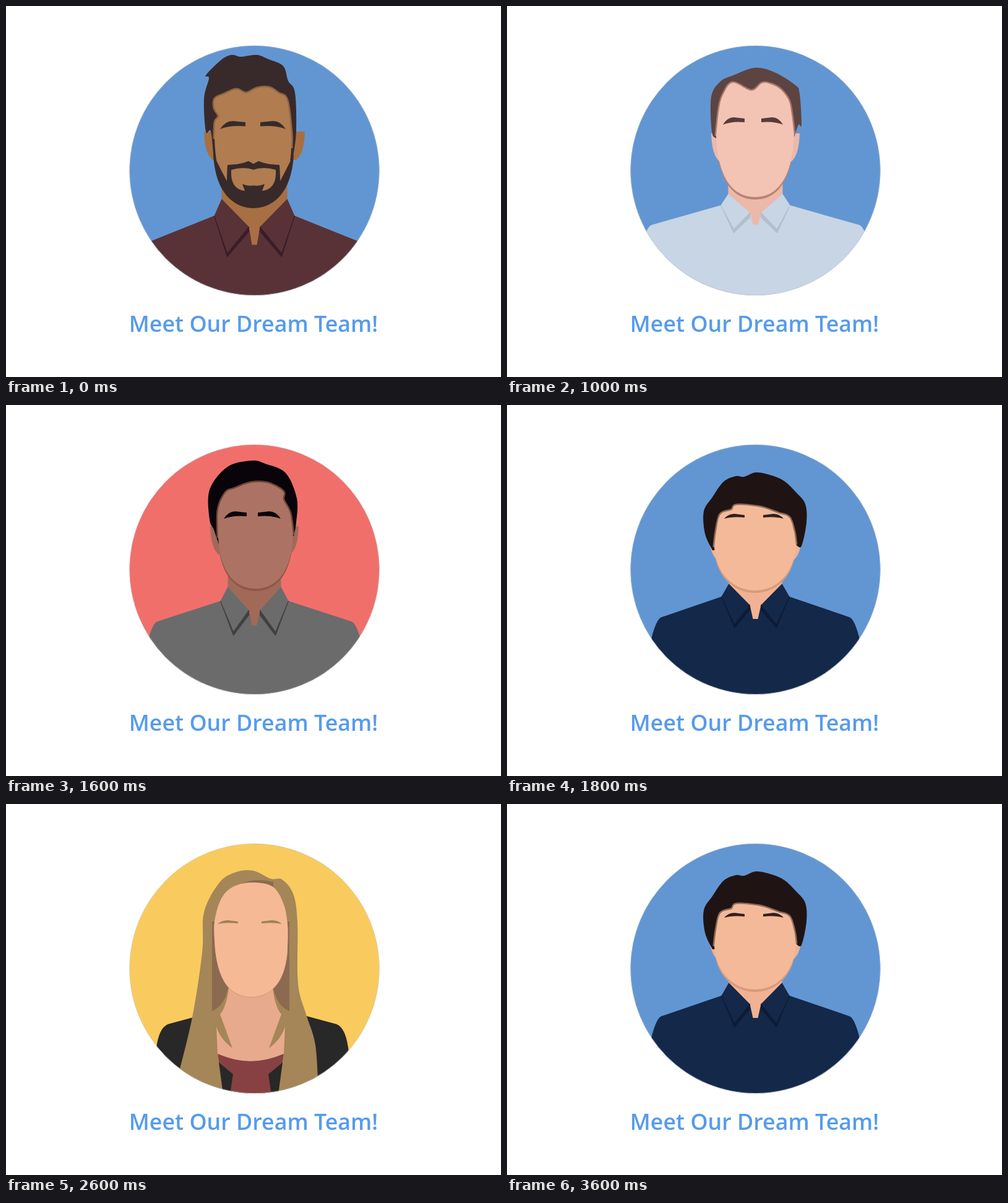
These frames come from a looping animation (800x600 px, 3.8 s). An HTML page:

```html
<!DOCTYPE html>
<html lang="en">
<head>
<meta charset="utf-8">
<title>Meet Our Dream Team!</title>
<style>
  html, body { margin: 0; width: 100%; height: 100%; overflow: hidden; background: #fff; }
  svg { display: block; width: 100%; height: 100%; }
  text { font: 600 35.8px "Open Sans", sans-serif; fill: #569bec; text-anchor: middle; }
</style>
</head>
<body>
<svg viewBox="0 0 800 600">
  <clipPath id="disc"><circle cx="401.5" cy="266" r="202"/></clipPath>
  <g clip-path="url(#disc)">
    <rect id="backdrop" x="199" y="63" width="406" height="406"/>
    <g id="portraits"></g>
  </g>
  <circle cx="401.5" cy="266" r="201.7" fill="none" stroke="#c4c4ca" stroke-opacity=".5"/>
  <text x="400" y="527">Meet Our Dream Team!</text>
</svg>
<script>
const CENTER = 401.5;

const fill = (color, d, extra = '') => `<path fill="${color}" d="${d}" ${extra}/>`;
const mirror = (markup, axis = CENTER) =>
  `${markup}<g transform="matrix(-1 0 0 1 ${2 * axis} 0)">${markup}</g>`;

// Catmull-Rom spline through "x y x y ..." key points
function curve(keys) {
  const n = keys.split(' ').map(Number);
  const count = n.length / 2;
  const at = i => { const k = 2 * Math.max(0, Math.min(count - 1, i)); return [n[k], n[k + 1]]; };
  let d = `M${at(0)}`;
  for (let i = 0; i < count - 1; i++) {
    const [a, b, c, e] = [-1, 0, 1, 2].map(k => at(i + k));
    const out = b.map((v, k) => v + (c[k] - a[k]) / 6);
    const into = c.map((v, k) => v - (e[k] - b[k]) / 6);
    d += `C${out} ${into} ${c}`;
  }
  return d;
}

// Hairline across the forehead, closed by a rounded chin
function faceOutline(hairline, chin) {
  const n = hairline.split(' ').map(Number);
  const left = n[0], top = n[1], right = n[n.length - 2];
  const mid = (left + right) / 2;
  return curve(hairline) +
    `C${right - 3} ${chin - 22} ${mid + 30} ${chin} ${mid} ${chin}` +
    `C${mid - 30} ${chin} ${left + 3} ${chin - 22} ${left} ${top}z`;
}

// Collar proportions follow from its top edge, half width and depth
function shirt({ color, seam, top, half, depth, shoulder: [sx, sy] }) {
  const outer = [CENTER - half - 12, top + depth * .29];
  const tip = [CENTER - half + 9, top + depth];
  const notch = [CENTER - 9, top + depth * .48];
  const bottom = top + depth * .79;
  const body = `M${sx - 16} ${sy + 32}Q${sx - 8} ${sy + 2} ${sx} ${sy}L${outer} ${CENTER - half} ${top} ${notch}` +
    ` ${CENTER - 4} ${bottom}H${CENTER + .5}V470H${sx - 16}z`;
  const edge = `M${outer}L${tip} ${notch[0]} ${notch[1] + 8} ${notch} ${tip[0]} ${tip[1] - 6}z`;
  return mirror(fill(color, body) + fill(seam, edge, `stroke="${seam}"`));
}

const ears = (color, x, y) =>
  mirror(fill(color, `M${x} ${y}q1 36 14 46h26v-46z`));

const brows = (color, x, y, width, height, axis) => mirror(fill(color,
  `M${x} ${y}q${width * .2} ${-height} ${width * .5} ${-height}l${width * .5} 2v${height * .5}q${-width * .6} -2 ${-width} ${height * .5 - 2}z`), axis);

const beard = (jaw, chin, skin) => mirror(
  fill(jaw, 'M335 240C338 302 368 327 401 327V256L392 251Q378 257 358 257L357 283 349 268z') +
  fill(chin, 'M401 314C375 314 355 302 345 279L357 283 358 257Q378 257 392 251L401 256z') +
  fill(skin, 'M364 265Q384 259 401 265V290Q392 292 382 288L386 299Q362 296 364 265z'), 400);

function portrait(p) {
  const face = faceOutline(p.hairline, p.chin);
  const { half, top, depth } = p.shirt;
  return fill(p.neck, `M${CENTER - half} 235h${2 * half}V${top + depth * .8}h${-2 * half}z`) +
    fill(p.shade, face, 'transform="translate(0 4)"') +
    shirt(p.shirt) +
    ears(p.neck, ...p.ears) +
    fill(p.hair, curve(p.outline) + 'z') +
    `<path fill="none" stroke="${p.fringe}" stroke-width="5" d="${curve(p.hairline)}"/>` +
    fill(p.skin, face) +
    (p.beard ? beard(...p.beard, p.skin) : '') +
    brows(...p.brows);
}

function longHairPortrait() {
  const hair = '#a58658', shade = '#8b6a50', jacket = '#282828';
  const hairline = '337 220 337 190 347 155 365 135 395 127 430 133 448 160 455 195 455 235';
  const face = faceOutline(hairline, 312);
  return mirror(fill(jacket, 'M242 402Q246 362 262 356L310 343H400V470H242z'), 398) +
    fill(hair, curve('270 470 300 350 317 240 320 175 345 127 372 110 400 108 428 121 446 122 464 145 471 190 472 290 485 340 500 390 505 470') + 'z') +
    mirror(
      fill(shade, 'M333 190V335Q358 325 362 280H396V190z') +
      fill('#884143', 'M342 402H396V470H352z') +
      fill(jacket, 'M344 418L367 437 362 470H351z') +
      fill('#e8aa8c', 'M362 270Q360 325 346 340L366 395Q346 380 340 360L342 404Q370 416 396 416V270z'), 395.5) +
    fill('#d4947a', face, 'transform="translate(0 1)"') +
    fill(shade, 'M358 146Q385 115 432 126V140z') +
    fill('#f5b996', face) +
    brows('#a08052', 342, 194, 33, 6, 394);
}

const portraits = [
  portrait({
    skin: '#b07c50', neck: '#a76f42', shade: '#8d5736', hair: '#382a2a', fringe: '#8f6346',
    shirt: { color: '#593237', seam: '#3a1d28', top: 312, half: 53, depth: 94, shoulder: [230, 382] },
    ears: [320, 203], chin: 322, beard: ['#382a2a', '#382a2a'], brows: ['#382a2a', 346, 199, 41, 13, 399],
    outline: '336 250 331 203 323 203 320 150 328 117 323 112 348 87 365 79 380 82 405 79 424 86 448 97 456 121 467 140 469 203 463 250',
    hairline: '337 215 338 188 344 178 337 165 338 150 352 143 372 135 388 141 406 133 425 132 440 141 454 152 461 205 461 230',
  }),
  portrait({
    skin: '#f0bda9', neck: '#edb79f', shade: '#cf9684', hair: '#33231f', fringe: '#1d1312',
    shirt: { color: '#21304f', seam: '#1a2140', top: 290, half: 53, depth: 74, shoulder: [234, 349] },
    ears: [329, 197], chin: 300, brows: ['#291a1a', 349, 181, 44, 15, 403],
    outline: '343 216 338 203 329 195 326 165 334 128 352 104 387 95 415 90 438 97 448 113 462 115 470 128 480 155 479 190 475 207 467 206',
    hairline: '343 215 344 190 356 166 357 145 370 129 405 128 422 123 440 134 452 146 450 160 456 172 466 187 466 206',
  }),
  portrait({
    skin: '#f3c4b4', neck: '#ecb8aa', shade: '#b88375', hair: '#5d4441', fringe: '#a67869',
    shirt: { color: '#c7d5e5', seam: '#b2c0cb', top: 304, half: 44, depth: 63, shoulder: [234, 354] },
    ears: [330, 206], chin: 309, brows: ['#573b3c', 349, 192, 35, 12, 397.5],
    outline: '338 214 331 203 330 147 345 122 366 112 400 100 432 107 466 128 473 142 476 192 471 192 464 212',
    hairline: '338 210 343 165 350 142 365 124 395 137 412 125 425 126 441 134 455 152 460 175 464 208',
  }),
  portrait({
    skin: '#ac7364', neck: '#a16a58', shade: '#8f584b', hair: '#08040a', fringe: '#6e4638',
    shirt: { color: '#6b6b6b', seam: '#3f4040', top: 294, half: 43, depth: 79, shoulder: [245, 350] },
    ears: [330, 196], chin: 297, brows: ['#08040a', 352, 184, 37, 12, 398],
    outline: '344 226 336 202 329 185 329 137 358 100 397 90 419 95 452 110 470 151 469 190 465 212',
    hairline: '343 215 343 170 355 142 370 135 395 126 421 126 440 134 449 142 448 153 459 175 464 210',
  }),
  portrait({
    skin: '#e9a985', neck: '#e8a37e', shade: '#c98364', hair: '#5b4138', fringe: '#aa805f',
    shirt: { color: '#acaaba', seam: '#454863', top: 317, half: 52, depth: 94, shoulder: [232, 386] },
    ears: [325, 212], chin: 322, beard: ['#4e3b36', '#b18464'], brows: ['#5b4138', 342, 194, 44, 16, 400],
    outline: '336 250 333 180 340 148 349 128 360 98 377 87 395 81 425 97 441 122 458 136 463 160 470 182 465 250',
    hairline: '337 225 336 185 344 155 354 130 370 121 395 119 430 121 440 127 456 150 465 185 464 225',
  }),
  longHairPortrait(),
  portrait({
    skin: '#f4b998', neck: '#f0b292', shade: '#d79a7b', hair: '#1f1413', fringe: '#8b6b5b',
    shirt: { color: '#14284a', seam: '#0d1c35', top: 289, half: 43, depth: 72, shoulder: [250, 343] },
    ears: [326, 205], chin: 300, brows: ['#30201f', 351, 184, 33, 8, 399],
    outline: '332 235 320 208 318 172 332 149 350 124 370 115 383 116 403 109 428 114 448 123 467 141 482 160 484 190 476 228 467 226',
    hairline: '335 230 338 205 345 177 363 170 371 162 408 165 438 175 456 182 464 205 467 226',
  }),
];

const colors = { B: '#6296d2', R: '#f06f6b', Y: '#f9cb5e' };
// Each step: portrait index and backdrop color
const steps = '0B 3R 5Y 1R 6Y 2B 4R 5Y 3R 6B 1Y 4B 0R 5Y 2B 1R 4Y 3R 6B'.split(' ');
const STEP_MS = 200;

const stage = document.getElementById('portraits');
const backdrop = document.getElementById('backdrop');
stage.innerHTML = portraits.map(markup => `<g>${markup}</g>`).join('');
const groups = [...stage.children];

function draw() {
  const [index, color] = steps[Math.floor(performance.now() / STEP_MS) % steps.length];
  backdrop.setAttribute('fill', colors[color]);
  groups.forEach((group, i) => { group.style.display = i === +index ? '' : 'none'; });
  requestAnimationFrame(draw);
}
draw();
</script>
</body>
</html>
```
